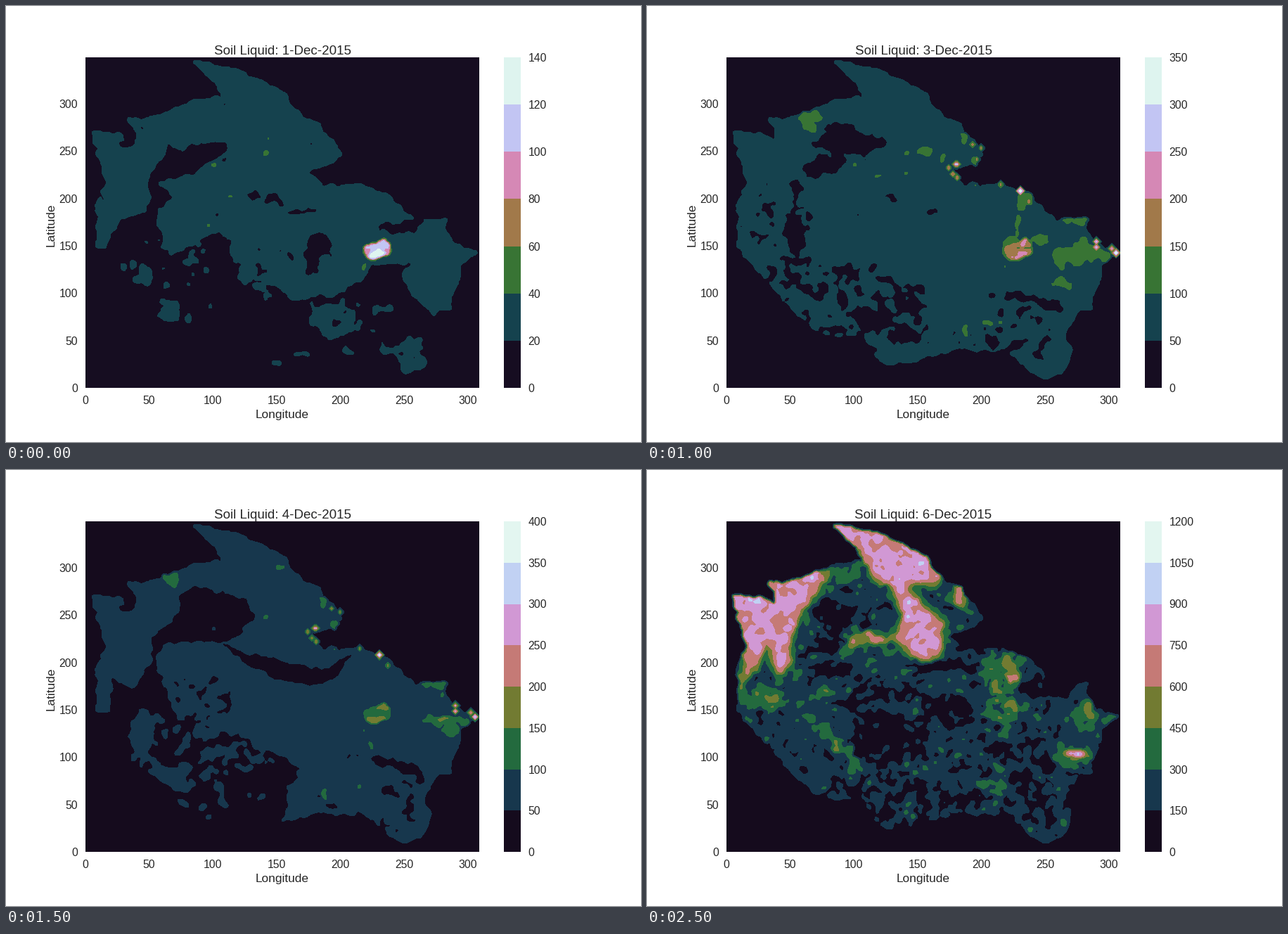
Recreate the animation shown at these times as a matplotlib script. Size 903 px wide and 620 px high, loop 3 s.

```python
import numpy as np
import matplotlib.pyplot as plt
from matplotlib.animation import FuncAnimation
from matplotlib.path import Path

W, H, DPI = 903, 620, 128
LEFT, TOP, RIGHT, BOTTOM = 113, 73, 673, 543
INK = "#262626"
plt.rcParams["font.family"] = "Liberation Sans"


def pt(px):
    return px * 72 / DPI


def smooth(a, n):
    for _ in range(n):
        for ax in (0, 1):
            a = (np.roll(a, 1, ax) + 2 * a + np.roll(a, -1, ax)) / 4
    return a


# Maps are laid out in stage pixels on a two-pixel grid.
X, Y = np.meshgrid(np.arange(LEFT, RIGHT + 1, 2.0), np.arange(TOP, BOTTOM + 1, 2.0))
LON = (X - LEFT) / (RIGHT - LEFT) * 309
LAT = (BOTTOM - Y) / (BOTTOM - TOP) * 349


def noise(seed, n=7):
    a = smooth(np.random.default_rng(seed).normal(size=X.shape), n)
    return a / a.std()


# Warped coordinates make every edge ragged.
DX, DY = noise(1), noise(2)
PTS = np.column_stack([(X + 1.7 * DX).ravel(), (Y + 1.4 * DY).ravel()])
BX, BY = X + 3.2 * DX, Y + 2.6 * DY


def area(*xy):
    return Path(np.reshape(xy, (-1, 2))).contains_points(PTS).reshape(X.shape)


def blob(x, y, rx, ry, slope=0):
    dx = BX - x
    return (dx / rx) ** 2 + ((BY - y - slope * dx) / ry) ** 2 < 1


def blobs(*shapes):
    return np.any([blob(*s) for s in shapes], axis=0)


def fleck(u, v, z, seed, *zones):
    u[blobs(*zones) & (noise(seed) > z)] = v


NORTH_EAST = [264, 77, 297, 82, 354, 99, 403, 130, 410, 150, 443, 168, 455, 180,
              477, 210, 466, 224, 431, 235, 452, 256, 503, 253, 540, 266, 578, 304,
              630, 304, 621, 315, 641, 338, 670, 350, 648, 366, 645, 392, 632, 432, 606, 438]
SOUTH_WEST = [594, 475, 606, 490, 590, 525, 566, 530, 508, 490, 440, 488, 400, 500,
              336, 510, 310, 470, 250, 466, 214, 440, 152, 372, 128, 345, 134, 300,
              123, 292, 140, 250, 123, 179, 168, 181, 186, 194, 176, 160, 222, 155,
              266, 132, 308, 131, 286, 100]
LAND = area(*NORTH_EAST, *SOUTH_WEST)
ON_LAND = smooth(LAND.astype(float), 2)
LAKE = area(510, 344, 520, 336, 538, 331, 547, 345, 541, 356, 515, 356)
GULF = blob(565, 313, 32, 10, -0.15)
SOUTH = (520, 460, 90, 55)

# Damp ground that stays through the two dry days
DAMP = blobs((230, 434, 13, 17), (262, 441, 5, 8), (200, 382, 11, 20, 0.3),
             (535, 431, 15, 5), (442, 430, 7, 12), (449, 462, 7, 8),
             (477, 440, 17, 17), (505, 460, 20, 6), (550, 492, 25, 7, 0.3),
             (578, 506, 18, 13), (487, 491, 12, 5), (384, 504, 5, 5))

# Wet rim of the coast on days 3 and 4
RIM = LAKE | blobs((451, 185, 4, 9), (466, 222, 6, 5), (466, 258, 12, 3),
                   (608, 306, 22, 3), (450, 462, 5, 7))
PEAKS = [(429, 230, 4.2), (440, 225, 6), (435, 239, 4), (441, 244, 4.2),
         (463, 197, 3.7), (475, 202, 3.6), (469, 218, 3.5), (503, 254, 3.7),
         (531, 263, 7.5), (543, 278, 4), (639, 335, 5.4), (639, 343, 5.6),
         (661, 345, 5), (667, 351, 7)]


def add_peaks(u, scale):
    for x, y, v in PEAKS:
        d = abs(X - x) + abs(Y - y)
        u = np.maximum(u, scale * v * (1 - d / 9))
    return u


def finish(u, rough):
    return smooth(u, 1) + rough * noise(30, 5) * ON_LAND


def dry():
    return np.full(X.shape, 0.5)


def wet():
    return np.where(LAND, 1.5, 0.5)


def day1():
    u = wet()
    u[area(250, 206, 232, 198, 204, 240, 199, 290, 160, 305, 140, 345, 113, 350,
           113, 543, 605, 543, 605, 436, 575, 412, 564, 380, 573, 368, 520, 367,
           506, 392, 468, 411, 400, 417, 388, 400, 340, 382, 313, 345, 320, 334,
           302, 322, 238, 351, 214, 310, 216, 292, 238, 272, 214, 250, 268, 237,
           313, 206, 314, 194, 268, 196)] = 0.5
    u[GULF | blobs((178, 192, 14, 14), (445, 338, 19, 18), (436, 366, 11, 16),
                   (351, 269, 9, 5), (378, 276, 12, 7), (422, 293, 20, 3))] = 0.5
    u[DAMP | blobs((465, 445, 28, 26), (576, 484, 18, 11), (420, 494, 12, 5))] = 1.5
    fleck(u, 1.5, 0.75, 11, (225, 360, 60, 42), (350, 380, 45, 35))
    fleck(u, 0.5, 1.3, 12, (370, 375, 50, 30), SOUTH)
    u[LAKE] = 5.5
    u[LAKE & (Y > 344) & (abs(X - 529) > 8)] = 4.5
    u[LAKE & (Y > 346 + 0.6 * abs(X - 530))] = 6.6
    return finish(u, 0.17)


def day2():
    u = dry()
    u[DAMP | area(287, 82, 354, 101, 403, 132, 428, 165, 362, 160, 318, 153, 303, 118)] = 1.5
    u[blobs((262, 151, 38, 11, -0.3), (195, 173, 9, 10), (440, 193, 12, 12),
            (458, 203, 8, 7), (395, 208, 16, 12), (362, 245, 18, 8, -0.5),
            (405, 247, 24, 9, 0.5), (446, 266, 22, 11), (153, 238, 8, 16),
            (180, 254, 11, 22, -0.4), (157, 273, 20, 7), (240, 250, 14, 4),
            (264, 291, 18, 17), (231, 316, 14, 10, 0.3), (248, 335, 14, 17))] = 1.5
    u[blobs((363, 303, 13, 7), (366, 353, 10, 7, -0.3), (408, 362, 19, 11, 0.4),
            (525, 286, 18, 24), (510, 318, 24, 24), (480, 335, 20, 14),
            (487, 380, 22, 18, -0.3), (468, 402, 17, 9), (606, 357, 46, 32),
            (612, 404, 30, 30), (574, 332, 18, 10))] = 1.5
    u[~LAND] = 0.5
    fleck(u, 1.5, 1.7, 13, (395, 330, 70, 45), SOUTH, (185, 260, 60, 70))
    fleck(u, 0.5, 1.6, 14, (560, 340, 110, 95))
    u[LAKE] = 4.5
    u[LAKE & (abs(X - 528) > 12) & (Y > 341) & (Y < 349)] = 3.5
    u[LAKE & (Y > 348 + 0.5 * abs(X - 530))] = 5.6
    return finish(u, 0.13)


def day3():
    u = wet()
    fleck(u, 0.5, 0.4, 15, (310, 430, 95, 65), (225, 400, 50, 35))
    fleck(u, 0.5, 1.0, 16, SOUTH, (190, 320, 50, 75))
    u[blobs((290, 196, 50, 14), (252, 226, 32, 14, -0.3), (275, 177, 26, 9),
            (211, 264, 8, 18), (211, 325, 15, 30), (152, 326, 7, 8),
            (348, 272, 11, 5, 0.4), (408, 292, 9, 4), (370, 421, 19, 17),
            (318, 444, 27, 16, 0.3), (365, 469, 25, 14), (556, 421, 36, 7, 0.3),
            (488, 477, 12, 8))] = 0.5
    u[RIM | blobs((228, 166, 9, 14), (240, 158, 13, 5), (396, 207, 9, 9),
                  (333, 241, 7, 3), (369, 242, 5, 3), (415, 215, 4, 6),
                  (526, 312, 6, 17), (528, 345, 21, 15), (561, 335, 15, 8),
                  (598, 358, 24, 10), (630, 354, 28, 11), (617, 340, 9, 11),
                  (588, 396, 17, 5), (482, 451, 6, 4), (538, 274, 8, 11))] = 2.5
    u[LAKE] = 3.6
    u[LAKE & (abs(Y - 344) < 3) & (X > 524)] = 2.5
    u[blobs((529, 352, 11, 3), (537, 335, 3, 4))] = 4.6
    return add_peaks(finish(u, 0.15), 1)


def day4():
    u = wet()
    u[area(244, 178, 268, 166, 342, 182, 352, 214, 318, 245, 225, 246, 214, 262,
           222, 300, 246, 354, 335, 376, 395, 410, 428, 430, 400, 450, 392, 543,
           113, 543, 113, 345, 148, 345, 150, 295, 183, 310, 205, 265, 208, 238, 250, 200)] = 0.5
    u[area(300, 243, 345, 260, 448, 285, 493, 260, 476, 292, 440, 307, 380, 297, 338, 275)] = 0.5
    u[blobs((178, 192, 14, 14), (556, 421, 36, 8, 0.3), (312, 324, 9, 8))] = 0.5
    fleck(u, 1.5, 0.5, 17, (290, 395, 100, 45), (225, 390, 50, 45))
    fleck(u, 1.5, 1.3, 18, (310, 460, 70, 40))
    fleck(u, 0.5, 0.9, 19, SOUTH, (275, 325, 45, 35))
    u[blobs((195, 374, 18, 32), (238, 440, 26, 13, 0.4), (465, 436, 50, 22))] = 1.5
    u[RIM | blobs((235, 157, 11, 8), (630, 357, 32, 7), (634, 370, 12, 6),
                  (390, 139, 3, 4), (519, 390, 5, 4), (616, 320, 4, 4))] = 2.5
    u[LAKE & (abs(Y - 346) > 6)] = 3.5
    u[blob(624, 354, 6, 4)] = 3.5
    u[blob(529, 353, 7, 2)] = 4.4
    return add_peaks(finish(u, 0.15), 0.95)


def day5():
    u = wet()
    fleck(u, 0.5, 0.2, 20, (335, 470, 90, 40), (345, 330, 65, 35))
    fleck(u, 0.5, 0.5, 21, SOUTH, (530, 375, 60, 45))
    u[GULF | blobs((266, 209, 27, 24), (250, 253, 38, 9, -0.3), (262, 283, 32, 10),
                   (425, 280, 65, 8), (340, 385, 55, 38), (435, 343, 30, 27),
                   (570, 308, 42, 15), (535, 438, 22, 9))] = 0.5
    west = area(123, 178, 168, 181, 186, 194, 176, 160, 222, 155, 240, 145, 255, 150,
                212, 215, 200, 275, 186, 300, 172, 245, 152, 285, 130, 312, 140, 250)
    north = area(264, 77, 297, 82, 354, 99, 403, 130, 418, 163, 366, 165, 420, 215,
                 418, 270, 385, 272, 350, 240, 365, 215, 352, 170, 318, 152, 303, 118)
    hot = west | north | blobs((331, 240, 12, 8), (441, 182, 11, 13))
    spread = smooth(hot.astype(float), 14) / (smooth(LAND.astype(float), 14) + 0.05)
    u += np.where(LAND, 4.2 * spread, 0)
    # Each layer of blobs lifts the ground by one level.
    lifts = [blobs((502, 290, 30, 30), (505, 340, 22, 20), (624, 350, 20, 24),
                   (606, 410, 32, 18), (265, 385, 42, 11, 0.95), (250, 318, 18, 9),
                   (300, 246, 26, 14, -0.4), (492, 455, 18, 9, 0.5), (165, 325, 34, 20),
                   (275, 148, 30, 12)),
             blobs((523, 276, 16, 20), (495, 310, 7, 14), (530, 336, 19, 5),
                   (625, 342, 9, 14), (608, 406, 15, 8), (303, 242, 15, 9, -0.6),
                   (178, 323, 16, 6)),
             blobs((153, 187, 14, 6), (235, 153, 12, 6), (331, 240, 11, 5),
                   (342, 162, 10, 5), (393, 207, 6, 6), (145, 231, 5, 9),
                   (206, 214, 6, 6), (521, 295, 6, 5), (390, 137, 5, 7))]
    for lift in lifts:
        u += lift & LAND
    u = finish(u, 0.36)
    for x, y, v in [(603, 403, 6), (613, 404, 7)]:
        u = np.maximum(u, v * (1 - np.hypot(X - x, 2 * (Y - y)) / 24))
    return u


soaked = day5()
DAYS = [(day1(), 7, 20), (day2(), 7, 20), (day3(), 7, 50),
        (day4(), 8, 50), (soaked, 8, 150), (soaked * 0.94, 8, 150)]

fig = plt.figure(figsize=(W / DPI, H / DPI), dpi=DPI, facecolor="white")


def box(x, w):
    return fig.add_axes([x / W, 1 - BOTTOM / H, w / W, (BOTTOM - TOP) / H])


ax = box(LEFT, RIGHT - LEFT)
cax = box(708, 23.5)


def label(x, y, text, px, **kw):
    return fig.text(x / W, 1 - y / H, text, fontsize=pt(px), color=INK,
                    ha="center", va="baseline", **kw)


title = label(393, 69, "", 18.83)
label(393, 586, "Longitude", 17.26)
label(69, 311, "Latitude", 17.26, rotation=90, rotation_mode="anchor")


def draw(i):
    u, n, step = DAYS[i]
    ax.clear()
    cax.clear()
    levels = np.arange(n + 1) * step
    values = np.clip(u, 0.05, n - 0.05) * step
    cs = ax.contourf(LON, LAT, values, levels, cmap="cubehelix")
    ax.set(xlim=(0, 309), ylim=(0, 349), xticks=range(0, 301, 50), yticks=range(0, 301, 50))
    bar = fig.colorbar(cs, cax=cax, ticks=levels)
    bar.outline.set_visible(False)
    for a in (ax, cax):
        a.tick_params(length=0, pad=pt(11), labelsize=pt(15.7), labelcolor=INK)
        a.spines[:].set_visible(False)
    title.set_text(f"Soil Liquid: {i + 1}-Dec-2015")
    return []


anim = FuncAnimation(fig, draw, frames=6, interval=500, init_func=lambda: draw(0),
                     repeat=True, repeat_delay=0, blit=False)
plt.show()
```
